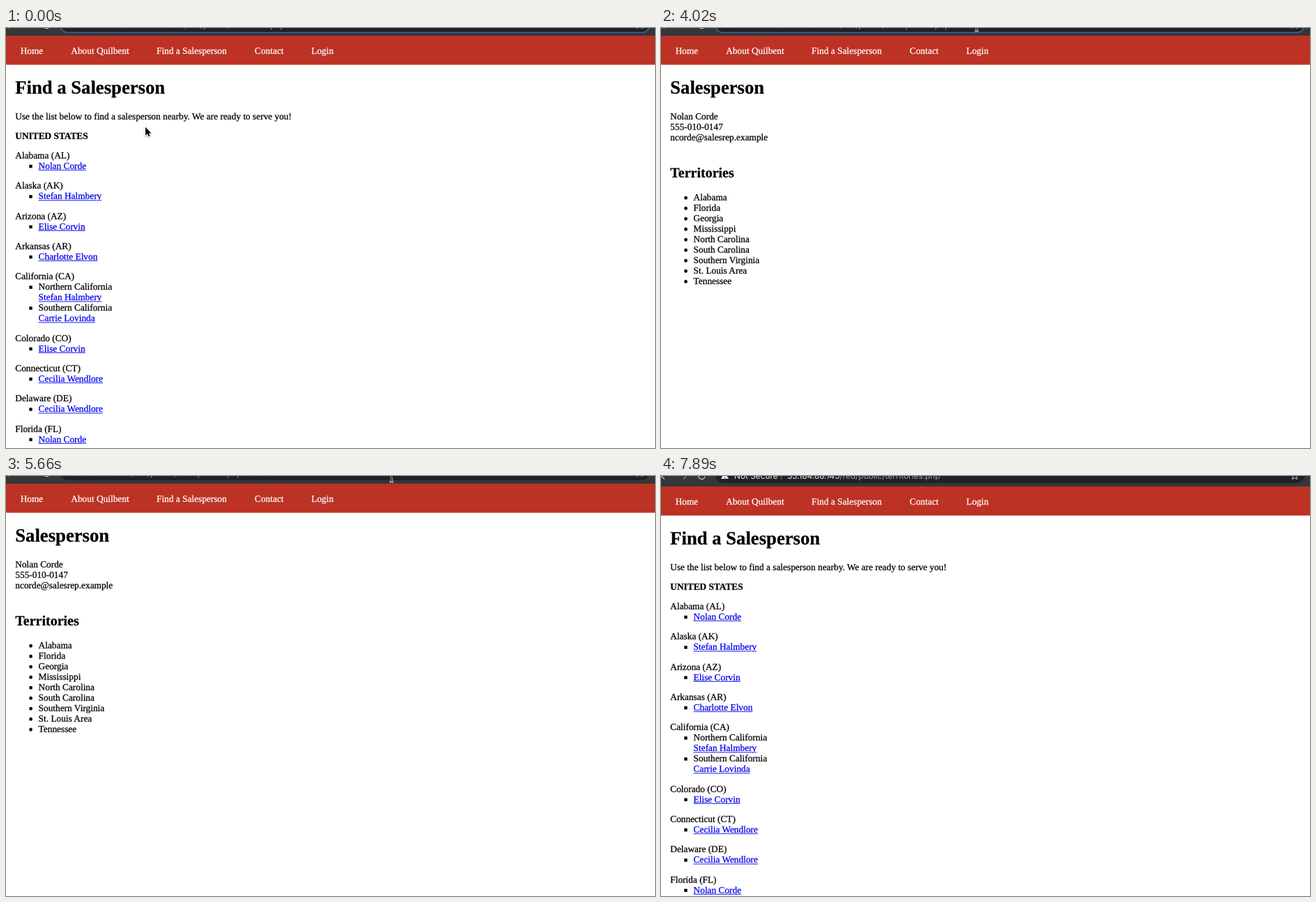
Write an HTML page with a canvas that moves like this. It is 931 px wide and 602 px high and loops after 8 s.

```html
<!DOCTYPE html>
<html lang="en">
<head>
<meta charset="utf-8">
<title>Find a Salesperson</title>
<style>
  html, body { margin: 0; width: 100%; height: 100%; overflow: hidden; background: #fff; }
  canvas { display: block; width: 931px; height: 602px; }
</style>
</head>
<body>
<canvas id="stage"></canvas>
<script>
const W = 931, H = 602, LOOP = 8000;
const canvas = document.getElementById('stage');
const ctx = canvas.getContext('2d');
const ratio = window.devicePixelRatio || 1;
canvas.width = W * ratio;
canvas.height = H * ratio;

const SERIF = '"Liberation Serif", "Times New Roman", serif';
const SANS = 'Inter, Roboto, sans-serif';
const BODY = `13.333px ${SERIF}`;
const UI = `11.85px ${SANS}`;
const UI_BOLD = `700 12px ${SANS}`;
const LINE = 15, GAP = 13.33;

const NAV = [['Home', 20.7], ['About Quilbent', 93.3], ['Find a Salesperson', 216],
  ['Contact', 356.8], ['Login', 438]];

// Each state holds [region, person] pairs; region is optional.
const STATES = [
  ['Alabama (AL)', ['', 'Nolan Corde']],
  ['Alaska (AK)', ['', 'Stefan Halmbery']],
  ['Arizona (AZ)', ['', 'Elise Corvin']],
  ['Arkansas (AR)', ['', 'Charlotte Elvon']],
  ['California (CA)', ['Northern California', 'Stefan Halmbery'], ['Southern California', 'Carrie Lovinda']],
  ['Colorado (CO)', ['', 'Elise Corvin']],
  ['Connecticut (CT)', ['', 'Cecilia Wendlore']],
  ['Delaware (DE)', ['', 'Cecilia Wendlore']],
  ['Florida (FL)', ['', 'Nolan Corde']]
];
const CONTACT = ['Nolan Corde', '555-010-0147', 'ncorde@salesrep.example'];
const TERRITORIES = ['Alabama', 'Florida', 'Georgia', 'Mississippi', 'North Carolina',
  'South Carolina', 'Southern Virginia', 'St. Louis Area', 'Tennessee'];

const HOST = '35.184.88.145';
const LIST_PATH = '/red/public/territories.php';
const PERSON_PATH = '/red/public/salesperson.php?id=';
const INJECTION = "' OR 1=1'--";

// Timelines: [start in ms, ...values]; each holds until the next entry.
const POINTER = [
  [0, 'arrow', 200, 142], [150, 'arrow', 180, 152], [300, 'arrow', 143, 172],
  [450, 'arrow', 106, 191], [600, 'hand', 84, 203], [1050, 'arrow', 84, 203],
  [1200, 'arrow', 100, 194], [1350, 'arrow', 152, 160], [1500, 'arrow', 245, 104],
  [1650, 'arrow', 350, 50], [1800, 'arrow', 430, 14], [1950, 'beam', 467, -6],
  [2100, 'beam', 467, -8.5], [2400, 'none', 0, 0], [4020, 'beam', 453, -4],
  [4160, 'beam', 505, -5], [4310, 'beam', 552, -5], [5060, 'arrow', 552, -1],
  [5510, 'beam', 552.5, -1], [5660, 'beam', 553, 0], [6410, 'arrow', 554, 20],
  [6560, 'arrow', 555, 6], [6710, 'none', 0, 0]
];
const PAGE = [[0, 'list'], [1050, 'person'], [5810, 'list']];
const FOCUS = [[0, true], [750, false], [2100, true], [5510, false]];
const ADDRESS = [
  [0, true, LIST_PATH], [1050, true, PERSON_PATH + '1'], [3280, true, PERSON_PATH],
  [5510, false, PERSON_PATH + '%27'], [5810, false, LIST_PATH], [6410, true, LIST_PATH]
];
const SHIFT = [[0, 0], [7150, 2], [7300, 3], [7450, 4]];

function at(track, t) {
  let hit = track[0];
  for (const entry of track) if (entry[0] <= t) hit = entry;
  return hit.slice(1);
}

function text(str, x, y, font = BODY, color = '#000') {
  ctx.font = font;
  ctx.fillStyle = color;
  ctx.fillText(str, x, y);
  if (font.includes(SERIF)) {
    // A hairline outline gives the heavier strokes of smoothed type.
    ctx.strokeStyle = color;
    ctx.lineWidth = 0.25;
    ctx.strokeText(str, x, y);
  }
  return x + ctx.measureText(str).width;
}

function rect(x, y, w, h, color) {
  ctx.fillStyle = color;
  ctx.fillRect(x, y, w, h);
}

function disc(x, y, r, color) {
  ctx.fillStyle = color;
  ctx.beginPath();
  ctx.arc(x, y, r, 0, Math.PI * 2);
  ctx.fill();
}

function line(points, color, width) {
  ctx.strokeStyle = color;
  ctx.lineWidth = width;
  ctx.beginPath();
  points.forEach(([x, y]) => ctx.lineTo(x, y));
  ctx.stroke();
}

function link(str, x, y) {
  ctx.font = BODY;
  rect(x, y + 1.2, ctx.measureText(str).width, 0.9, '#0000ee');
  // A white halo breaks the underline around descenders.
  ctx.strokeStyle = '#fff';
  ctx.lineWidth = 2;
  ctx.strokeText(str, x, y);
  text(str, x, y, BODY, '#0000ee');
}

function drawNav() {
  rect(0, 11, W, 41.67, '#bc3224');
  NAV.forEach(([label, x]) => text(label, x, 36.8, BODY, '#fff'));
}

function heading(str, y, size) {
  text(str, 13.3, y, `bold ${size}px ${SERIF}`);
}

function drawList() {
  heading('Find a Salesperson', 94, 26.67);
  text('Use the list below to find a salesperson nearby. We are ready to serve you!', 13.3, 130.8);
  text('UNITED STATES', 13.3, 159, `bold 13.333px ${SERIF}`);
  let y = 187.1;
  for (const [state, ...reps] of STATES) {
    text(state, 13.3, y);
    y += LINE;
    for (const [region, person] of reps) {
      rect(33.3, y - 6, 4.4, 4.4, '#000');
      if (region) {
        text(region, 46.6, y);
        y += LINE;
      }
      link(person, 46.6, y);
      y += LINE;
    }
    y += GAP;
  }
}

function drawPerson() {
  heading('Salesperson', 94, 26.67);
  CONTACT.forEach((row, i) => text(row, 13.3, 130.8 + i * LINE));
  heading('Territories', 214, 20);
  TERRITORIES.forEach((name, i) => {
    const y = 247.1 + i * LINE;
    disc(35.6, y - 3.6, 2.4, '#000');
    text(name, 46.6, y);
  });
}

function drawToolbar(focused) {
  rect(0, -30, W, 41, '#35363a');
  ctx.beginPath();
  ctx.roundRect(77.5, -17.5, 846, focused ? 24 : 23.5, 11.7);
  ctx.fillStyle = '#202124';
  ctx.fill();
  if (focused) {
    ctx.strokeStyle = '#2f6795';
    ctx.lineWidth = 1.7;
    ctx.stroke();
  }
  line([[5, 0.5], [0.5, -4], [5, -8.5]], '#c6c8ca', 1.3);
  line([[32, 0.5], [36.5, -4], [32, -8.5]], '#85878a', 1.3);
  ctx.strokeStyle = '#c6c8ca';
  ctx.beginPath();
  ctx.arc(58.5, -4.2, 4.7, 0.2, 5.4);
  ctx.stroke();
  line([[909, -9], [910.5, -5], [914, -5], [911.3, -2.6], [912.7, 0.6], [909, -1.4],
    [905.3, 0.6], [906.7, -2.6], [904, -5], [907.5, -5], [909, -9]], '#c6c8ca', 1);
}

function drawAddress(secureNote, path) {
  let x = 105;
  if (secureNote) {
    ctx.fillStyle = '#e8eaed';
    ctx.beginPath();
    ctx.moveTo(91.5, -9.5);
    ctx.lineTo(97, 0);
    ctx.lineTo(86, 0);
    ctx.fill();
    rect(91, -2.2, 1.1, 1.2, '#202124');
    text('Not Secure', x, -0.2, UI, '#e8eaed');
    rect(172, -9, 1, 10, '#6b6d70');
    x = 181;
  }
  x = text(HOST, x, -0.2, UI, '#e8eaed');
  text(path, x, -0.2, UI, '#9aa0a6');
}

function drawSuggestions() {
  const base = `https://${HOST}${PERSON_PATH}`;
  ctx.save();
  ctx.shadowColor = 'rgba(0,0,0,0.4)';
  ctx.shadowBlur = 10 * ratio;
  ctx.shadowOffsetY = 4.2 * ratio;
  ctx.fillStyle = '#202124';
  ctx.beginPath();
  ctx.roundRect(71.7, -30, 857.6, 100, 6);
  ctx.fill();
  ctx.restore();
  text(base + INJECTION, 114, -0.2, UI, '#e8eaed');
  rect(71.7, 10, 857.6, 30, '#46474a');

  disc(91.5, 25, 5.6, '#bdc1c6');
  line([[87.5, 22.5], [90.5, 25], [92.5, 25.5], [91, 29]], '#46474a', 1.5);
  line([[92, 20.5], [93, 22.5], [95.8, 23.5]], '#46474a', 1.4);
  text('Find a ', 114, 29.2, UI, '#e8eaed');
  text('Salesperson', 150.3, 29.2, UI_BOLD, '#f1f3f4');
  text('-', 226.5, 29.2, UI, '#9aa0a6');
  text(base + '%27 OR 1=1%27--', 235.5, 29.2, UI_BOLD, '#8ab4f8');

  ctx.strokeStyle = '#bdc1c6';
  ctx.lineWidth = 1.3;
  ctx.beginPath();
  ctx.arc(90, 53.7, 3.2, 0, Math.PI * 2);
  ctx.stroke();
  line([[92.4, 56.1], [96, 59.7]], '#bdc1c6', 1.5);
  text(base + INJECTION, 114, 59.2, UI, '#f1f3f4');
  text('- Bendlo Search', 473.5, 59.2, UI, '#9aa0a6');
}

const ARROW = new Path2D('M0 0V12L2.8 9.5L4.6 13.6L6.5 12.7L4.7 8.7H8.4Z');
const HAND = new Path2D('M-1.3 1Q0 -1 1.3 1V6Q3 4.8 3.9 6.4Q5.6 5.5 6.4 7.2Q8.6 6.6 8.6 9' +
  'Q8.7 12.5 6.8 14.5V16.5H-1.5V15Q-4 12 -5.5 9.3Q-4.5 7.2 -1.3 10Z');
const BEAM = new Path2D('M-3 -8.5Q0 -8.5 0 -6V6Q0 8.5 -3 8.5M3 -8.5Q0 -8.5 0 -6V6Q0 8.5 3 8.5M-2 4H2');

function drawPointer(kind, x, y) {
  if (kind === 'none') return;
  ctx.save();
  ctx.translate(x, y);
  if (kind === 'beam') {
    ctx.strokeStyle = '#f4f4f4';
    ctx.lineWidth = 2.4;
    ctx.stroke(BEAM);
    ctx.strokeStyle = '#111';
    ctx.lineWidth = 0.9;
    ctx.stroke(BEAM);
  } else {
    const hand = kind === 'hand';
    const shape = hand ? HAND : ARROW;
    ctx.shadowColor = 'rgba(0,0,0,0.35)';
    ctx.shadowBlur = 2 * ratio;
    ctx.shadowOffsetY = ratio;
    ctx.strokeStyle = hand ? '#000' : '#fff';
    ctx.lineWidth = hand ? 1.6 : 2;
    ctx.stroke(shape);
    ctx.shadowColor = 'transparent';
    ctx.fillStyle = hand ? '#fff' : '#000';
    ctx.fill(shape);
  }
  ctx.restore();
}

function render(t) {
  ctx.setTransform(ratio, 0, 0, ratio, 0, 0);
  ctx.lineJoin = 'round';
  ctx.textRendering = 'geometricPrecision';
  rect(0, 0, W, H, '#fff');
  ctx.translate(0, at(SHIFT, t)[0]);
  drawNav();
  if (at(PAGE, t)[0] === 'list') drawList();
  else drawPerson();
  drawToolbar(at(FOCUS, t)[0]);
  if (t >= 4910 && t < 5510) drawSuggestions();
  else drawAddress(...at(ADDRESS, t));
  drawPointer(...at(POINTER, t));
}

const start = performance.now();
function tick() {
  render((performance.now() - start) % LOOP);
  requestAnimationFrame(tick);
}
tick();
</script>
</body>
</html>
```
